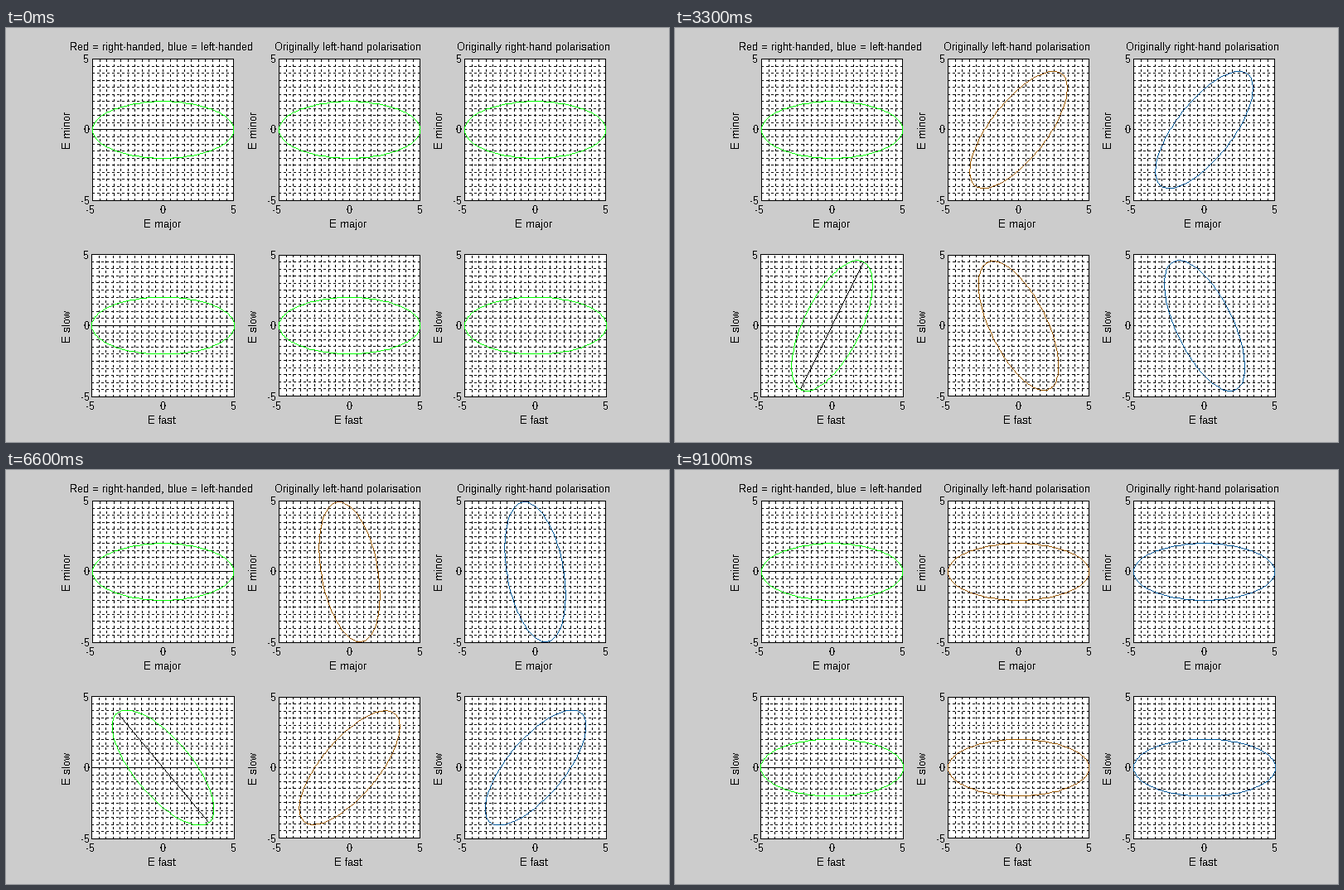
Animation of 800x500 px, one loop 9.2 s. Source, as a matplotlib script:

```python
import numpy as np
import matplotlib.pyplot as plt
from matplotlib.animation import FuncAnimation
from matplotlib.collections import LineCollection

W, H, DPI = 800, 500, 100
PX = 72 / DPI                 # one pixel in points
FRAMES, INTERVAL = 92, 100
MAJOR, MINOR = 5, 2

GREEN = (0, 1, 0)
BROWN = (153 / 255, 88 / 255, 0)
BLUE = (0, 88 / 255, 153 / 255)

# Border pixels of each panel: left, top, right, bottom.
BOXES = (((104, 37, 274, 208), (329, 37, 499, 208), (553, 37, 723, 208)),
         ((103, 273, 275, 445), (329, 274, 499, 444), (553, 273, 724, 445)))
LEFTS = (104, 329, 553)
TOPS = (37, 274)
TITLES = ("Red = right-handed, blue = left-handed",
          "Originally left-hand polarisation",
          "Originally right-hand polarisation")
AXIS_NAMES = (("E major", "E minor"), ("E fast", "E slow"))

plt.rcParams.update({
    "font.family": "Liberation Sans",
    "font.size": 13 * PX,
    "text.hinting": "native",
    "text.hinting_factor": 1,
    "text.antialiased": False,
    "path.simplify": False,
})

fig = plt.figure(figsize=(W / DPI, H / DPI), dpi=DPI, facecolor="#cccccc")
ax = fig.add_axes([0, 0, 1, 1])
ax.set_xlim(0, W)
ax.set_ylim(H, 0)
ax.axis("off")

phase = np.radians(np.arange(0, 361, 3))


def to_pixels(box, x, y):
    left, top, right, bottom = box
    px = left + np.floor((np.asarray(x) + 5) * (right - left) / 10 + 0.5)
    py = bottom - np.floor((np.asarray(y) + 5) * (bottom - top) / 10 + 0.5)
    return px, py


def segments(lines, zorder, style="solid"):
    ax.add_collection(LineCollection(lines, colors="black", linewidths=PX, linestyles=style,
                                     capstyle="butt", snap=False, zorder=zorder))


def label(x, y, text, ha="center", **kw):
    ax.text(x, y, text, ha=ha, va="baseline", rotation_mode="anchor", **kw)


def draw_panel(box):
    left, top, right, bottom = box
    ax.add_patch(plt.Rectangle((left, top), right - left + 1, bottom - top + 1,
                               color="white", lw=0, zorder=0))

    def row_line(y):
        return [(left, y + 0.5), (right + 1, y + 0.5)]

    def column_line(x):
        return [(x + 0.5, bottom + 1), (x + 0.5, top)]

    ticks = np.arange(-4.5, 5, 0.5)
    columns, rows = to_pixels(box, ticks, ticks)
    segments([row_line(y) for y in rows] + [column_line(x) for x in columns], 1, (0, (3, 3)))
    segments([row_line(top), row_line(bottom), column_line(left), column_line(right)], 2)
    if left < LEFTS[1]:
        segments([row_line(to_pixels(box, 0, 0)[1])], 3)


def draw_labels(left, top, names):
    bottom = top + 171
    for text, dx in (("-5", -2), ("0", 85.5), ("5", 171)):
        label(left + dx, bottom + 16, text)
    for text, dy in (("5", 5), ("0", 90), ("-5", 176)):
        label(left - 3, top + dy, text, ha="right")
    label(left + 84, bottom + 33, names[0])
    label(left - 26, top + 86, names[1], rotation=90)


def rotated_ellipse(angle):
    c, s = np.cos(angle), np.sin(angle)
    u, v = MAJOR * np.cos(phase), MINOR * np.sin(phase)
    return u * c - v * s, u * s + v * c


def pixel_line():
    return ax.plot([], [], lw=PX, color="black", solid_capstyle="butt", snap=False)[0]


def set_pixels(line, box, x, y):
    """Draw a crisp polyline, one pixel per step along each segment's longer side."""
    px, py = to_pixels(box, x, y)
    steps = np.maximum(abs(np.diff(px)), abs(np.diff(py)))
    at = np.concatenate([[0], np.cumsum(steps)])
    every = np.arange(at[-1] + 1)
    px = np.floor(np.interp(every, at, px) + 0.5)
    py = np.floor(np.interp(every, at, py) + 0.5) + 0.5
    gap = np.full_like(px, np.nan)
    line.set_data(np.column_stack([px, px + 1, gap]).ravel(),
                  np.column_stack([py, py, gap]).ravel())


axis_line = pixel_line()
axis_line.set_zorder(4)
curves = {}
for row, top in enumerate(TOPS):
    for col, left in enumerate(LEFTS):
        draw_panel(BOXES[row][col])
        draw_labels(left, top, AXIS_NAMES[row])
        curves[row, col] = pixel_line()
        curves[row, col].set_zorder(5)
for left, title in zip(LEFTS, TITLES):
    label(left + 83.5, 27, title)


def update(i):
    # The first frame shows the untouched state; then the plate turns 2 degrees per frame.
    theta = np.radians(2 * max(i - 1, 0))
    colors = (GREEN, BROWN, BLUE) if i else (GREEN,) * 3
    for (row, col), curve in curves.items():
        if col == 0:
            angle = theta * row
        else:
            angle = -theta if row else -2 * theta
        set_pixels(curve, BOXES[row][col], *rotated_ellipse(angle))
        curve.set_color(colors[col])
    ends = np.array([-MAJOR, MAJOR])
    set_pixels(axis_line, BOXES[1][0], ends * np.cos(theta), ends * np.sin(theta))
    return [*curves.values(), axis_line]


anim = FuncAnimation(fig, update, frames=FRAMES, interval=INTERVAL, repeat=True, repeat_delay=0)
plt.show()
```
